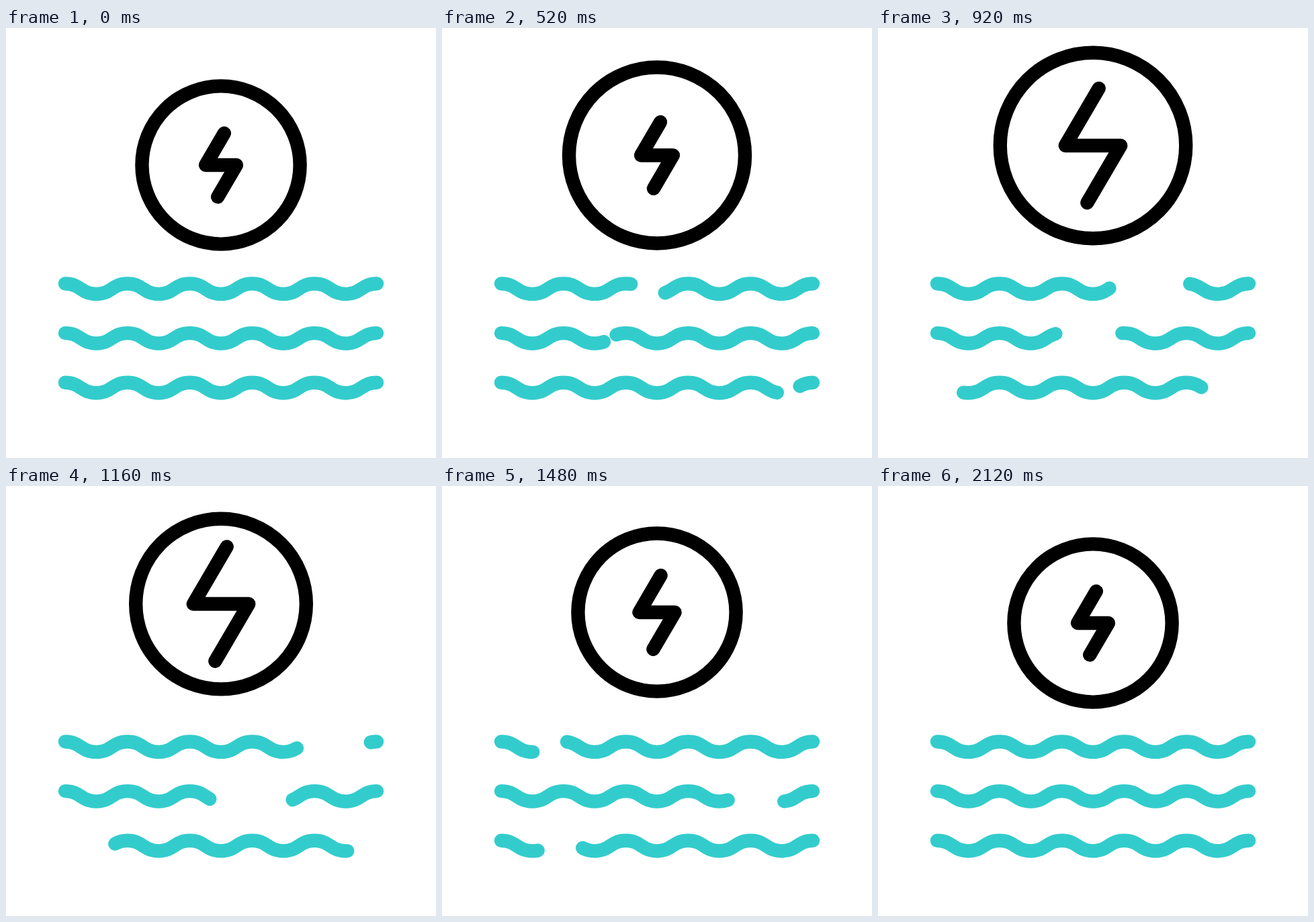
Write an HTML page that moves like this. It is 640x640 px and loops after 2160 ms.

```html
<!DOCTYPE html>
<html lang="en">
<head>
<meta charset="utf-8">
<title>Wave energy</title>
<style>
  html, body { margin: 0; width: 100%; height: 100%; overflow: hidden; background: #fff; }
  svg { display: block; width: 100%; height: 100%; }
  svg * { fill: none; stroke-width: 20.4; stroke-linecap: round; stroke-linejoin: round; }
  #ring, #bolt { stroke: #000; }
  .wave { stroke: #33cccc; }
</style>
</head>
<body>
<svg id="stage" viewBox="0 0 640 640">
  <circle id="ring" cx="320"/>
  <path id="bolt"/>
</svg>
<script>
const LOOP = 2160, STEP = 40;
const stage = document.getElementById('stage');
const ring = document.getElementById('ring');
const bolt = document.getElementById('bolt');

// Each gap opens and closes around `peak` while it travels along the line.
const waves = [
  { y: 380.5, peak: 1000, from: 0.152, speed: 0.000715 },
  { y: 454.1, peak: 1160, from: 0.081, speed: 0.000558 },
  { y: 527.8, peak: 1082, from: 0.795, speed: 0.000316 }
];
const GAP = 0.263, GAP_HALF_TIME = 860;

for (const wave of waves) {
  const period = 'c23.2 0 23.2 15.4 46.4 15.4s23.2-15.4 46.4-15.4';
  wave.path = document.createElementNS(stage.namespaceURI, 'path');
  wave.path.setAttribute('class', 'wave');
  wave.path.setAttribute('pathLength', 1);
  wave.path.setAttribute('d', `M88 ${wave.y}` + period.repeat(5));
  stage.append(wave.path);
}

function ease(t, start, end) {
  const p = Math.min(1, Math.max(0, (t - start) / (end - start)));
  return p * p * (3 - 2 * p);
}

// Rises from 0 to 1 over a..b, holds, and falls back over c..d.
const swell = (t, a, b, c, d) => ease(t, a, b) - ease(t, c, d);

function draw(t) {
  const y = 204 - 30 * swell(t, 30, 1030, 1030, 1970);
  ring.setAttribute('cy', y);
  ring.setAttribute('r', 117.6 + 23.6 * swell(t, 220, 770, 770, 1450));

  const k = 1 + 0.8 * swell(t, 463, 863, 1195, 1595);
  const points = [[4.8, -47.3], [-22.9, 0], [22.9, 0], [-4.8, 47.3]];
  bolt.setAttribute('d', 'M' + points.map(p => [320 + k * p[0], y + k * p[1]]).join('L'));

  for (const { path, peak, from, speed } of waves) {
    const gap = GAP * swell(t, peak - GAP_HALF_TIME, peak, peak, peak + GAP_HALF_TIME);
    const head = (from + speed * t) % 1;
    path.setAttribute('stroke-dasharray', gap > 0 ? `${1 - gap} ${gap}` : 'none');
    path.setAttribute('stroke-dashoffset', 1 - head);
  }
}

const begin = performance.now();
function tick() {
  const t = (performance.now() - begin) % LOOP;
  draw(Math.floor(t / STEP) * STEP);
  requestAnimationFrame(tick);
}
tick();
</script>
</body>
</html>
```
